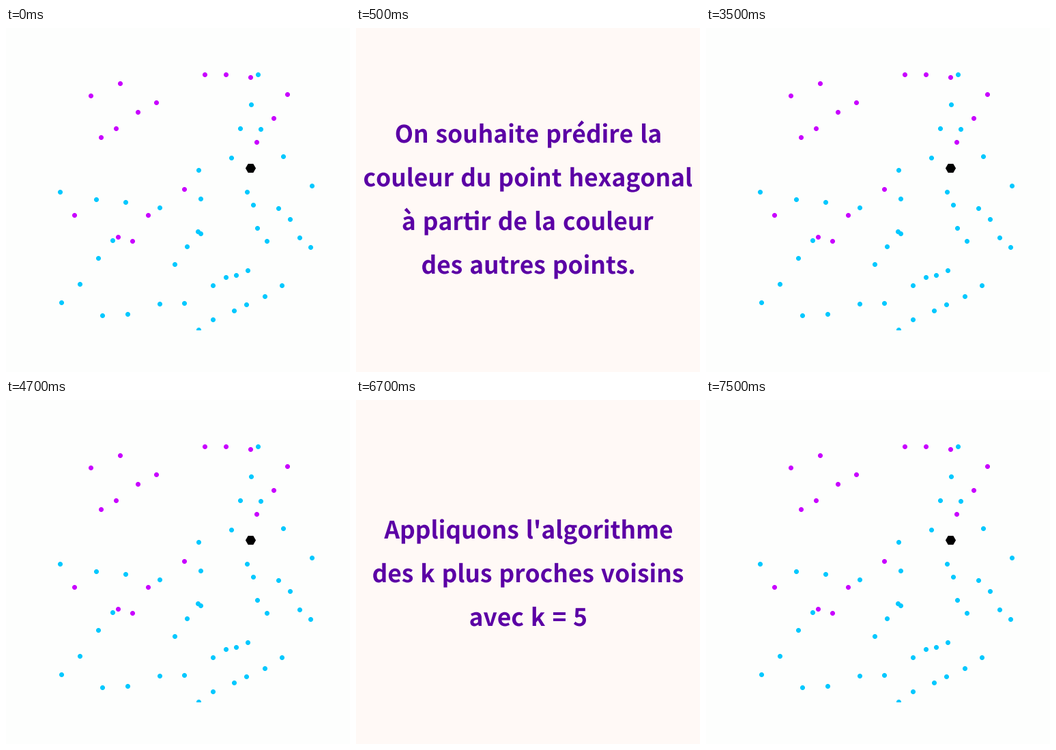
A matplotlib script for the animation above (8000 ms loop, 504x504 px).

```python
import matplotlib.pyplot as plt
import numpy as np
from matplotlib.animation import FuncAnimation
from matplotlib.patches import PathPatch, Rectangle
from matplotlib.textpath import TextPath
from matplotlib.transforms import Affine2D

SIDE, DPI = 504, 72
STEP_MS, STEPS = 500, 16
CYAN, MAGENTA, INK = "#00c8ff", "#c800ff", "#5b00a5"
PLOT_BG, TEXT_BG = "#fdfefd", "#fff9f6"
FONT = {"family": "Noto Sans CJK JP", "weight": "bold"}
SIZE, LEADING, MIDDLE = 35.3, 64, 252.2
WORD_SPACING = 2

rng = np.random.default_rng(5)

fig = plt.figure(figsize=(SIDE / DPI, SIDE / DPI), dpi=DPI)
ax = fig.add_axes([0, 0, 1, 1])
ax.set(xlim=(0, SIDE), ylim=(SIDE, 0))
ax.axis("off")


def strand(start, end, n=4):
    """Evenly spaced points between two fixed ends, loosened at random."""
    points = np.linspace(start, end, n)
    points[1:-1] += rng.uniform(-5, 5, (n - 2, 2))
    return points.round()


def dots(points, color, marker="o", size=6):
    xs, ys = np.transpose(points) + 0.5
    line, = ax.plot(xs, ys, marker, ms=size, color=color)
    # the plot area cuts through the lowest point
    line.set_clip_path(Rectangle((63, 60), 391, 382, transform=ax.transData))
    return line


def outline(text):
    return TextPath((0, 0), text, size=SIZE, prop=FONT)


def extent(text):
    return outline(text).get_extents()


def word_start(text):
    """Pen position after the given text, spaces included."""
    return extent(text + "n").x1 - extent("n").x1


def text_line(text, baseline):
    words = text.split()
    box = extent(text)
    width = box.x0 + box.x1 + WORD_SPACING * (len(words) - 1)
    left = MIDDLE - width / 2
    parts = []
    for i, word in enumerate(words):
        before = "".join(w + " " for w in words[:i])
        x = left + word_start(before) + WORD_SPACING * i
        place = Affine2D().scale(1, -1).translate(x, baseline) + ax.transData
        parts.append(PathPatch(outline(word), fc=INK, lw=0, transform=place))
        if "ti" in word:
            parts.append(ligature_bar(word, place))
    for part in parts:
        ax.add_patch(part)
    return parts


def ligature_bar(word, place):
    """Bar that joins the t and i of a "ti" ligature."""
    cut = word.index("ti") + 1
    start, end = extent(word[:cut]).x1 - 1, extent(word[:cut + 1]).x1 - 2
    height = 0.12 * SIZE
    return Rectangle((start, extent("x").y1 - height), end - start, height,
                     fc=INK, lw=0, transform=place)


def slide(lines, first):
    return [part for i, text in enumerate(lines)
            for part in text_line(text, first + i * LEADING)]


cyan = np.vstack([
    strand((368, 67), (329, 189)),
    strand((372, 147), (447, 230), 3),
    strand((352, 239), (381, 311)),
    strand((398, 263), (445, 320)),
    strand((78, 239), (224, 262)),
    strand((281, 207), (284, 300), 3),
    strand((280, 297), (246, 345), 3),
    strand((155, 310), (80, 401)),
    strand((140, 420), (260, 402)),
    strand((302, 376), (353, 354)),
    strand((281, 441), (403, 376), 6),
])
magenta = np.vstack([
    strand((290, 67), (357, 71), 3),
    strand((411, 96), (366, 166), 3),
    strand((123, 98), (166, 80), 2),
    strand((219, 108), (138, 159)),
    strand((260, 235), (163, 305), 3),
    strand((99, 273), (184, 311), 2),
])

scatter = [
    dots(cyan, CYAN),
    dots(magenta, MAGENTA),
    dots([(357, 204)], "black", "H", 14),
]
goal = slide(["On souhaite prédire la", "couleur du point hexagonal",
              "à partir de la couleur", "des autres points."], 168)
method = slide(["Appliquons l'algorithme", "des k plus proches voisins",
                "avec k = 5"], 203)


def update(step):
    if 1 <= step < 7:
        shown = goal
    elif 11 <= step < 15:
        shown = method
    else:
        shown = scatter
    for group in (scatter, goal, method):
        for artist in group:
            artist.set_visible(group is shown)
    fig.set_facecolor(PLOT_BG if shown is scatter else TEXT_BG)
    return shown


anim = FuncAnimation(fig, update, frames=STEPS, interval=STEP_MS,
                     repeat=True, repeat_delay=0, blit=False)
plt.show()
```
